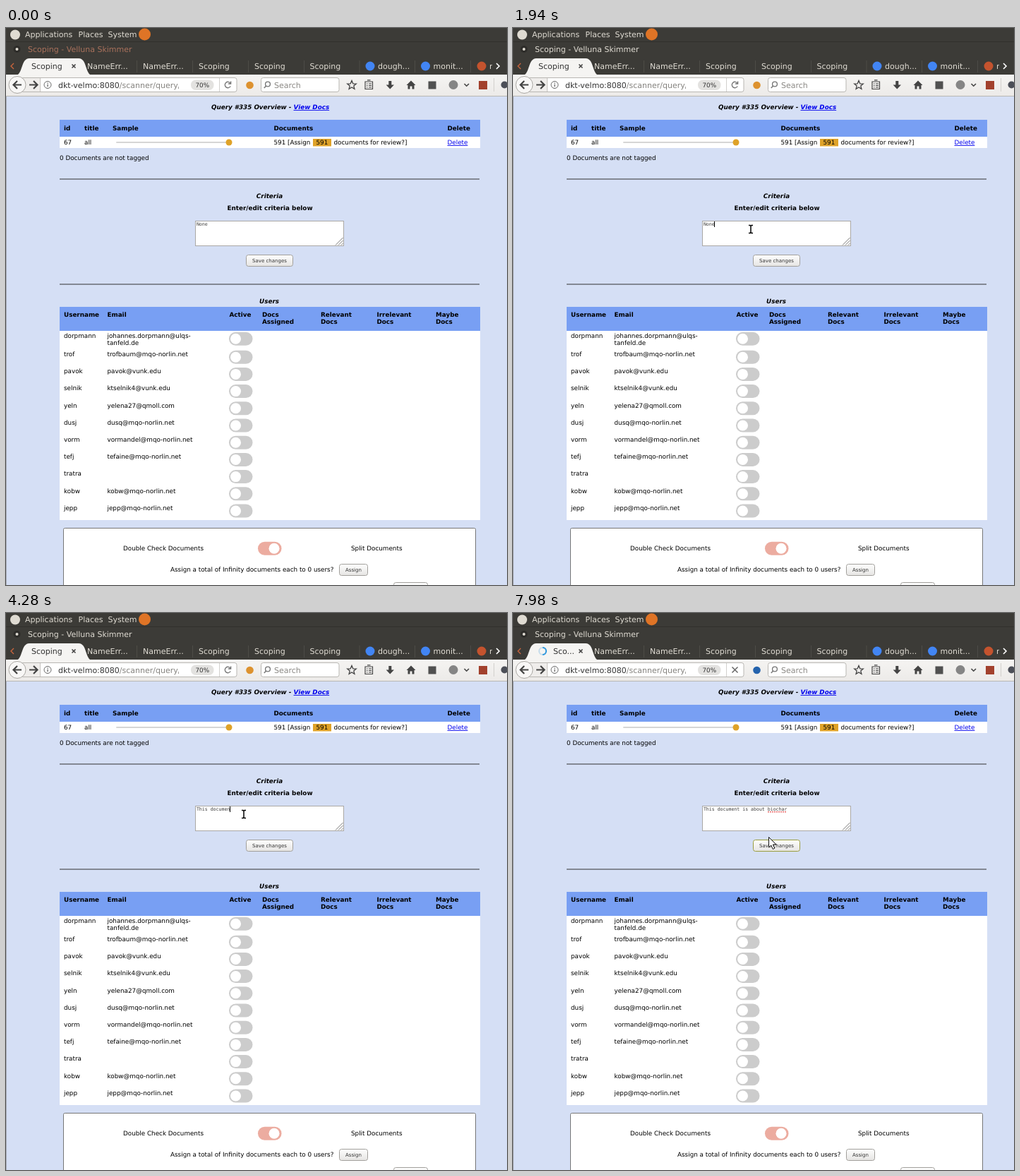
Animation of 710 by 789 pixels, one loop 8 s. Source, as an HTML page:

```html
<!DOCTYPE html>
<html lang="en">
<head>
<meta charset="utf-8">
<title>Query overview</title>
<style>
html, body { margin: 0; width: 100%; height: 100%; overflow: hidden; background: #d5dff5; }
svg { display: block; width: 710px; height: 789px; }
text { font: 8.8px "DejaVu Sans", Verdana, sans-serif; fill: #000; text-rendering: geometricPrecision; white-space: pre; }
.b { font-weight: bold; }
.i { font-weight: bold; font-style: italic; }
.mid { text-anchor: middle; }
.link { fill: #0000ee; text-decoration: underline; }
.ui { font-size: 11px; fill: #dfdbd2; }
.dark { fill: #333; }
.dim { fill: #8b8985; }
.btn { font-size: 7px; fill: #333; text-anchor: middle; }
.mono { font: 6.57px "DejaVu Sans Mono", monospace; fill: #3c3c3c; }
.line { fill: none; stroke: #444; stroke-width: 1.6; }
</style>
</head>
<body>
<svg id="stage" viewBox="0 0 710 789">
  <defs>
    <linearGradient id="face" x2="0" y2="1"><stop stop-color="#fefefe"/><stop offset="1" stop-color="#e6e5e3"/></linearGradient>
    <linearGradient id="nav" x2="0" y2="1"><stop stop-color="#f5f4f2"/><stop offset="1" stop-color="#eceae8"/></linearGradient>
    <clipPath id="urlClip"><path d="M50 70H245V92H50z"/></clipPath>
    <clipPath id="tabClip"><path d="M680 44H689V64H680z"/></clipPath>
  </defs>
  <g id="page"></g>
  <g id="chrome"></g>
  <g id="area">
    <rect x="268.5" y="273.5" width="210" height="35" fill="#fff" stroke="#aaa8a5"/>
    <path d="M467 307.5L477.5 297M471 307.5L477.5 301M475 307.5L477.5 305" stroke="#777" fill="none"/>
    <rect id="sel" x="270" y="274" width="16" height="8" fill="#f07746"/>
    <text id="typed" class="mono" x="269.9" y="280"></text>
    <path id="caret" d="M.5 274V282" stroke="#000"/>
    <path id="spell" d="M361 281.8H388" stroke="#e02020" stroke-dasharray="2 1"/>
  </g>
  <g id="ibeam" fill="none">
    <path d="M-3-5.5H3M0-5.5V5.5M-3 5.5H3" stroke="#fff" stroke-width="3"/>
    <path d="M-3-5.5H-1L0-4.5 1-5.5H3M0-4.5V4.5M-3 5.5H-1L0 4.5 1 5.5H3" stroke="#000" stroke-width="1.5"/>
  </g>
  <path id="arrow" d="M0 0V14.5L3.3 11.5 5.8 17 8.3 15.8 5.9 10.5H10.5z" fill="#fff" stroke="#111"/>
</svg>
<script>
const $ = id => document.getElementById(id);
const text = (x, y, s, cls = '', more = '') => `<text x="${x}" y="${y}" class="${cls}" ${more}>${s}</text>`;
const rect = (x, y, w, h, fill, more = '') => `<rect x="${x}" y="${y}" width="${w}" height="${h}" fill="${fill}" ${more}/>`;
const dot = (x, y, r, fill, more = '') => `<circle cx="${x}" cy="${y}" r="${r}" fill="${fill}" ${more}/>`;
const path = (d, more = 'class="line"') => `<path d="${d}" ${more}/>`;
const button = (x, y, w, label, id = '') =>
  rect(x + .5, y + .5, w - 1, 16, 'url(#face)', `rx="3" stroke="#a19f9b" id="${id}"`) + text(x + w / 2, y + 11, label, 'btn');
const toggle = (y, fill, x, knob) => rect(x, y - 9.5, 33.5, 19, fill, 'rx="9.5"') + dot(knob, y, 7.5, '#fff');

const users = [
  ['dorpmann', 'johannes.dorpmann@ulqs-'],
  ['trof', 'trofbaum@mqo-norlin.net'],
  ['pavok', 'pavok@vunk.edu'],
  ['selnik', 'ktselnik4@vunk.edu'],
  ['yeln', 'yelena27@qmoll.com'],
  ['dusj', 'dusq@mqo-norlin.net'],
  ['vorm', 'vormandel@mqo-norlin.net'],
  ['tefj', 'tefaine@mqo-norlin.net'],
  ['tratra', ''],
  ['kobw', 'kobw@mqo-norlin.net'],
  ['jepp', 'jepp@mqo-norlin.net']
];
const userRow = ([name, mail], i) => {
  const y = i ? 465 + 24.2 * (i - 1) : 439;
  return text(82, y, name) + text(143.5, y, mail) + toggle(y + 1.2, '#ccc', 316, 325.5);
};
const heads = (y, list) => list.map(([x, a, b]) => text(x, y, a, 'b') + (b ? text(x, y + 10, b, 'b') : '')).join('');

$('page').innerHTML =
  rect(0, 97, 710, 692, '#d5dff5') + rect(0, 97, 1, 692, '#a9adb8') +
  text(291, 115, 'Query #335 Overview - <tspan class="link">View Docs</tspan>', 'i') +
  rect(76, 130, 596, 24, '#789ff3') + rect(76, 154, 596, 16, '#fff') +
  heads(145, [[82, 'id'], [111, 'title'], [151, 'Sample'], [379.5, 'Documents'], [625.5, 'Delete']]) +
  text(82, 165, '67') + text(111, 165, 'all') +
  rect(156, 161, 160, 2, '#d6d6d6', 'rx="1"') + dot(316, 162, 4.5, '#dfa228') +
  text(379.5, 165, '591 [Assign') + rect(435, 157, 26, 10.5, '#dfa228') + text(439.5, 165, '591') +
  text(464.5, 165, 'documents for review?]') + text(625.5, 165, 'Delete', 'link') +
  text(76, 187, '0 Documents are not tagged') +
  rect(76, 213.5, 595, 1, '#333') + rect(76, 362.5, 595, 1, '#333') +
  text(373.5, 241, 'Criteria', 'i mid') + text(374, 258, 'Enter/edit criteria below', 'b mid') +
  button(340, 321, 67, 'Save changes', 'save') +
  text(373, 389.5, 'Users', 'i mid') +
  rect(76, 395, 596, 34, '#789ff3') + rect(76, 429, 596, 268, '#fff') +
  heads(409, [[82, 'Username'], [143.5, 'Email'], [316.5, 'Active'], [363, 'Docs', 'Assigned'],
    [446, 'Relevant', 'Docs'], [525.5, 'Irrelevant', 'Docs'], [609, 'Maybe', 'Docs']]) +
  users.map(userRow).join('') + text(143.5, 449, 'tanfeld.de') +
  rect(81.5, 708.5, 584, 90, '#fff', 'rx="2" stroke="#777"') +
  text(166, 740, 'Double Check Documents') + toggle(737.2, '#ecaca0', 357, 380) + text(489, 740, 'Split Documents') +
  text(233, 770, 'Assign a total of Infinity documents each to 0 users?') +
  button(472, 759, 41, 'Assign') + button(549, 785, 49, '');

const tabs = [[115, 'NameErr...'], [194, 'NameErr...'], [273, 'Scoping'], [352, 'Scoping'],
  [430.5, 'Scoping'], [527, 'dough...'], [605.5, 'monit...']];

$('chrome').innerHTML =
  rect(0, 0, 710, 66, '#3c3b37') + rect(0, 19, 710, 1, '#302f2c') +
  dot(13, 9.5, 7, '#dfdbd2') + dot(196.5, 9, 8.5, '#df7426') +
  text(27, 13.3, 'Applications', 'ui') + text(102.5, 13.3, 'Places', 'ui') + text(144.5, 13.3, 'System', 'ui') +
  dot(15.5, 30, 5, '#2d2c29') + dot(15.5, 30, 2, '#dfdbd2') +
  text(31, 33.8, 'Scoping - Velluna Skimmer', 'ui', 'id="title"') +
  // tab strip
  path('M11 50L7 54 11 58', 'fill="none" stroke="#c8643c" stroke-width="1.4"') +
  path('M695 50L699 54 695 58', 'fill="none" stroke="#fff" stroke-width="1.6"') +
  [185, 264, 343, 422, 500.5, 579, 658].map(x => rect(x, 46, 1, 17, '#4d4c47')).join('') +
  tabs.map(([x, s]) => text(x, 57.8, s, 'ui')).join('') +
  dot(516, 54, 6.5, '#4285f4') + dot(594.5, 54, 6.5, '#4285f4') + dot(674, 54, 6.5, '#c4532e') +
  text(685, 57.8, 'r', 'ui', 'clip-path="url(#tabClip)"') +
  path('M14 67C24 66 21 43 33 43H103C115 43 112 66 122 67z', 'fill="#f5f4f2"') +
  `<g id="idle">${text(36, 57.8, 'Scoping', 'ui dark')}</g>` +
  `<g id="busy">${text(57, 57.8, 'Sco...', 'ui dark')}` +
  dot(42, 54, 5, 'none', 'stroke="#c5dcec" stroke-width="2"') +
  path('M42 49A5 5 0 0 1 42 59', 'id="spin" fill="none" stroke="#2f98dd" stroke-width="2"') + '</g>' +
  path('M93.5 51.5L98.5 56.5M98.5 51.5L93.5 56.5') +
  // navigation bar
  rect(0, 66, 710, 31, 'url(#nav)') + rect(0, 96, 710, 1, '#b9b7b3') +
  rect(20.5, 70.5, 306.5, 20, '#fff', 'rx="3" stroke="#b8b6b2"') +
  path('M21 71H48V90H21z', 'fill="#efedeb"') + rect(48, 71, 1, 19, '#c6c4c0') +
  dot(16, 80.5, 12, '#f8f7f6', 'stroke="#aaa8a4"') +
  path('M22 80.5H11M16 75L10.5 80.5 16 86M33 80.5H44M39 75L44.5 80.5 39 86', 'fill="none" stroke="#444" stroke-width="2.2"') +
  dot(59, 80.5, 5, 'none', 'stroke="#666"') + rect(58.4, 79.8, 1.3, 3.4, '#666') + rect(58.4, 77.5, 1.3, 1.3, '#666') +
  `<g clip-path="url(#urlClip)">${text(74, 84.8, 'dkt-velmo:8080<tspan fill="#85837f">/scanner/query/335</tspan>', 'ui dark')}</g>` +
  rect(262, 73.5, 32.5, 14.5, '#e3e2e0', 'rx="7"') + text(278.3, 84, '70%', 'mid dark') +
  rect(302, 71, 1, 19, '#d2d0cd') +
  `<g id="reload">${path('M318 78.2A4.2 4.2 0 1 0 318.2 82.5M318.6 75.5V79H315', 'fill="none" stroke="#777" stroke-width="1.4"')}</g>` +
  `<g id="stop">${path('M310.5 76.5L318.5 84.5M318.5 76.5L310.5 84.5', 'fill="none" stroke="#666" stroke-width="1.5"')}</g>` +
  dot(345.5, 81, 5.3, '#dd922f', 'id="addon"') +
  rect(361.5, 70.5, 110.5, 20, '#fff', 'rx="3" stroke="#b8b6b2"') +
  dot(371, 79.5, 3.4, 'none', 'stroke="#777" stroke-width="1.4"') + path('M368.7 82L365.8 85', 'stroke="#777" stroke-width="1.6"') +
  text(380, 84.8, 'Search', 'ui dim') +
  path('M490 74.5L491.8 78.8 496.3 79.1 492.8 82 493.9 86.4 490 84 486.1 86.4 487.2 82 483.7 79.1 488.2 78.8z', 'class="line" style="stroke-width:1.3"') +
  path('M509 76H519.5V86.5H509zM512 73.8H516.5M511 79H512.5M514 79H518M511 81.5H512.5M514 81.5H518M511 84H512.5M514 84H518', 'class="line" style="stroke-width:1.2"') +
  path('M542.3 75H546.3V80.5H550L544.3 86.5 538.6 80.5H542.3z', 'fill="#444"') +
  path('M574 74.5L580.5 81H578.5V86.5H575.5V82.5H572.5V86.5H569.5V81H567.5z', 'fill="#444"') +
  rect(598.5, 75.5, 11, 11, '#505050') + dot(634, 80.5, 6.5, '#858585') +
  path('M649.5 79L652.7 82.2 656 79') + rect(670, 75, 12, 12, '#a2412d') + rect(691, 71, 1, 19, '#d2d0cd') +
  dot(706.5, 80.5, 5, '#4c4f58');

// cursor stops: time, x, y
const route = [[100, 686, 385], [280, 420, 300], [440, 337, 282], [620, 337, 282], [790, 341, 281], [1690, 341, 281],
  [1850, 337, 285], [6920, 337, 285], [6940, 284, 309], [7120, 335, 325], [7340, 395, 323], [7480, 395, 323], [7720, 362.5, 317.5]];
function cursorAt(t) {
  const n = route.findIndex(p => p[0] > t);
  if (n < 0) return route[route.length - 1].slice(1);
  const [a, x, y] = route[n - 1], [b, u, v] = route[n], k = (t - a) / (b - a);
  return [x + (u - x) * k, y + (v - y) * k];
}

// typing bursts: first key, last key, number of keys
const phrase = 'This document is about biochar';
const bursts = [[3060, 3060, 1], [3220, 3320, 2], [3480, 3580, 2], [3720, 3760, 2], [3900, 3940, 2],
  [4080, 4450, 5], [4610, 5350, 9], [5710, 5710, 1], [5890, 5890, 1], [6070, 6250, 3], [6390, 6500, 2]];
const keys = bursts.flatMap(([a, b, n]) => Array.from({ length: n }, (_, i) => n > 1 ? a + (b - a) * i / (n - 1) : a));

const show = (id, on) => $(id).setAttribute('visibility', on ? 'visible' : 'hidden');
const within = (t, a, b) => t >= a && t < b;

function draw(t) {
  const typed = t < keys[0] ? 'None' : phrase.slice(0, keys.filter(k => k <= t).length);
  const selected = within(t, 2150, 3060), sent = t >= 7760, loading = t >= 7820;
  $('typed').textContent = typed;
  $('typed').style.fill = selected ? '#fff' : '';
  show('sel', selected);
  $('caret').setAttribute('transform', `translate(${Math.floor(269.9 + 3.955 * typed.length)})`);
  show('caret', within(t, 1000, 2150) || within(t, 3060, 7760));
  show('spell', sent);

  $('title').style.fill = t < 700 ? '#a9715c' : '';
  const blue = within(t, 400, 1150) || within(t, 5430, 6150) || t >= 7900;
  $('addon').setAttribute('fill', blue ? '#2463ad' : '#dd922f');
  $('save').setAttribute('stroke', sent ? '#9a9d3c' : '#a19f9b');
  show('idle', !loading);
  show('reload', !loading);
  show('busy', loading);
  show('stop', loading);
  $('spin').setAttribute('transform', `rotate(${(t - 7980) * .45} 42 54)`);

  if (t < 100) {
    show('arrow', false);
    show('ibeam', false);
    return;
  }
  const [x, y] = cursorAt(t), inside = x > 268 && x < 479 && y > 273 && y < 310;
  show('ibeam', inside);
  show('arrow', !inside);
  $(inside ? 'ibeam' : 'arrow').setAttribute('transform', `translate(${x} ${y})`);
}

function frame() {
  draw(performance.now() % 8000);
  requestAnimationFrame(frame);
}
frame();
</script>
</body>
</html>
```
